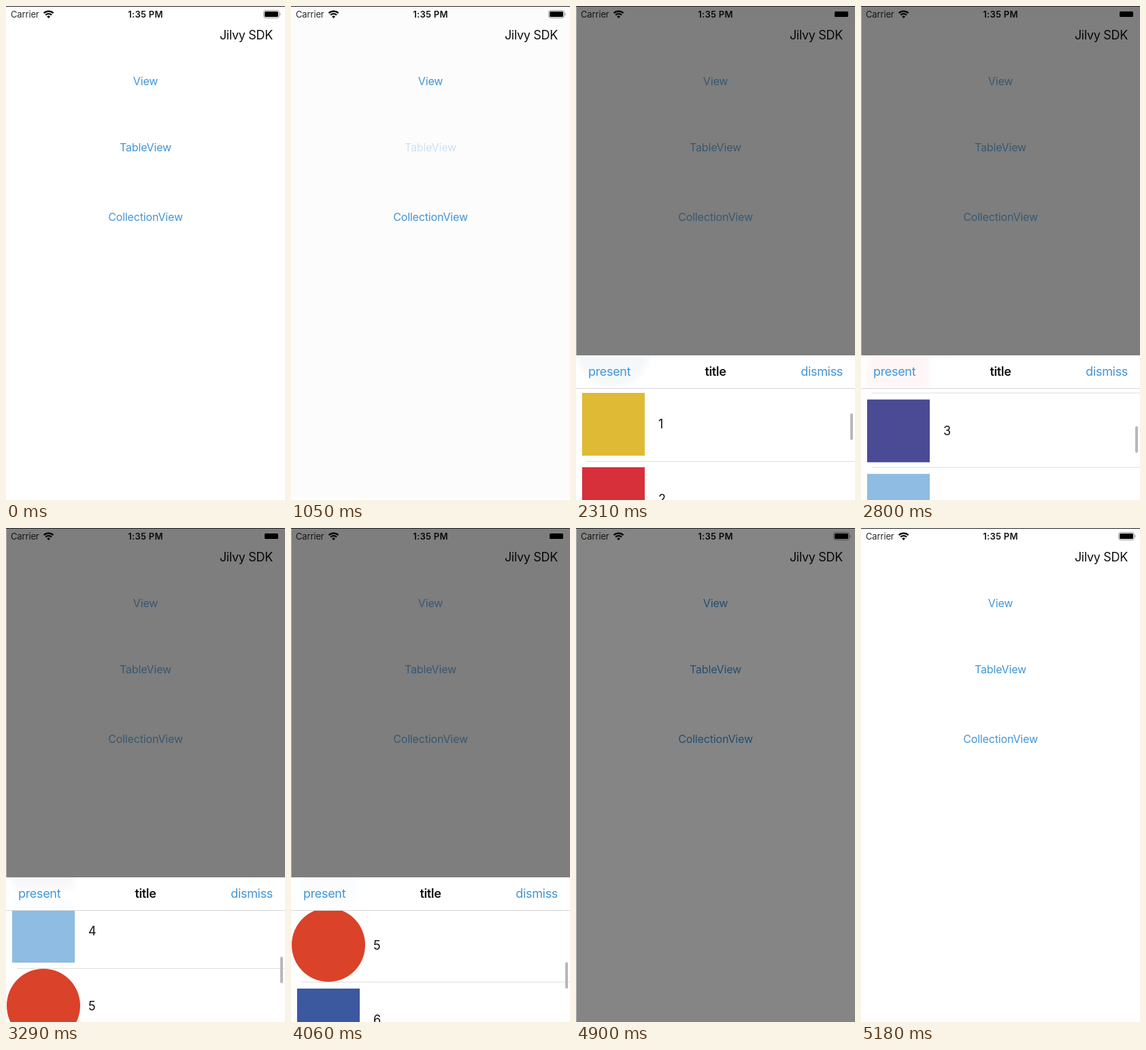
These frames come from a looping animation (410x724 px, 5460 ms). An HTML page:

```html
<!DOCTYPE html>
<html lang="en">
<head>
<meta charset="utf-8">
<title>Bottom sheet demo</title>
<style>
  html, body { margin: 0; width: 100%; height: 100%; overflow: hidden; background: #fff; }
  #stage {
    position: relative; width: 410px; height: 724px; overflow: hidden; background: #fff;
    font: 18px/24px Inter, sans-serif; letter-spacing: -.018em; color: #111;
  }
  #stage div, #stage svg { position: absolute; white-space: nowrap; }
  .link { color: #4196d8; }
  .menu { left: 0; width: 410px; text-align: center; font-size: 16px; letter-spacing: -.01em; }
  .status { top: 0; font-size: 13px; letter-spacing: -.01em; }
  #dim { inset: 1px 0 0; background: #000; border-left: 1px solid #666; }
  #sheet { left: 0; top: 512px; width: 410px; height: 212px; overflow: hidden; background: #fff; }
  #header {
    left: 0; top: 0; width: 410px; height: 48px; line-height: 48px;
    background: rgba(255, 255, 255, .955); backdrop-filter: blur(5px);
    border-bottom: 1px solid #d6d6d6;
  }
  #list { left: 0; top: 70px; width: 410px; }
  .row { left: 0; width: 410px; height: 109.33px; line-height: 109.33px; }
  .row::after { content: ""; position: absolute; left: 16px; right: 0; bottom: 0; height: 1px; background: #dedede; }
  .badge { left: 54.5px; top: 50%; transform: translate(-50%, -50%); }
  .number { left: 121px; letter-spacing: 0; }
  #bar { left: 403px; top: 73px; width: 4px; height: 39px; border-radius: 2px; background: #b8b8b8; }
</style>
</head>
<body>
<div id="stage">
  <div style="left:0;top:0;width:410px;height:1px;background:#222"></div>
  <div class="status" style="left:7px;color:#2a2a2a">Carrier</div>
  <div class="status" style="left:0;width:410px;text-align:center;font-weight:600;letter-spacing:.02em">1:35 PM</div>
  <svg width="410" height="24" style="left:0;top:0" fill="none" stroke="#000">
    <path d="M55.6 10.4a10 10 0 0 1 14 0M58.2 13.3a6.2 6.2 0 0 1 8.8 0" stroke-width="2.3"/>
    <path d="M62.6 18l-2.4-2.6a3.4 3.4 0 0 1 4.8 0z" fill="#000" stroke="none"/>
    <path id="outline" d="M381.5 6.5h17a3 3 0 0 1 3 3v5a3 3 0 0 1-3 3h-17a3 3 0 0 1-3-3v-5a3 3 0 0 1 3-3zM403 10.2v3.6"/>
    <rect x="380" y="8" width="20" height="8" rx="1.6" fill="#000" stroke="none"/>
  </svg>
  <div style="right:18px;top:31px">Jilvy SDK</div>
  <div id="menu">
    <div class="menu link" style="top:98px">View</div>
    <div class="menu link" style="top:195px" id="tapped">TableView</div>
    <div class="menu link" style="top:297px">CollectionView</div>
  </div>
  <div id="dim"></div>
  <div id="sheet">
    <div id="list"></div>
    <div id="header">
      <div class="link" style="left:18px">present</div>
      <div style="left:0;width:410px;text-align:center;font-weight:600">title</div>
      <div class="link" style="right:18px">dismiss</div>
    </div>
    <div id="bar"></div>
  </div>
</div>
<script>
const LOOP = 5460, STEP = 70, ROW = 109.33, SHEET = 212;
const byId = id => document.getElementById(id);
const menu = byId('menu'), tapped = byId('tapped'), outline = byId('outline'),
      dim = byId('dim'), sheet = byId('sheet'), list = byId('list'), bar = byId('bar');

// [colour, size, round]
const badges = [
  ['#2458a4', 109, true], ['#dfba35', 92], ['#d7303a', 92], ['#4b4a94', 92],
  ['#8fbce2', 92], ['#da4229', 108, true], ['#3c589f', 92], ['#c8323a', 92]
];
list.innerHTML = badges.map(([colour, size, round], i) =>
  `<div class="row" style="top:${i * ROW}px">
    <div class="badge" style="width:${size}px;height:${size}px;background:${colour};border-radius:${round ? '50%' : 0}"></div>
    <div class="number">${i}</div>
  </div>`).join('');

const ramp = (t, from, to) => Math.min(1, Math.max(0, (t - from) / (to - from)));
const ease = (t, from, to) => (1 - Math.cos(Math.PI * ramp(t, from, to))) / 2;

// [time, scroll offset, speed in px per ms]
const scrollPath = [[1990, 0, 0], [2310, 133, .5], [3290, 483, .22], [4060, 572, .05], [4480, 580, 0]];

function scrollAt(t) {
  const next = scrollPath.findIndex(key => t < key[0]);
  if (next === 0) return 0;
  if (next < 0) return scrollPath.at(-1)[1];
  const [t0, y0, v0] = scrollPath[next - 1], [t1, y1, v1] = scrollPath[next];
  const span = t1 - t0, u = (t - t0) / span;
  return y0 + (y1 - y0) * u * u * (3 - 2 * u)
    + span * u * (1 - u) * (v0 * (1 - u) - v1 * u);
}

function render(t) {
  const scroll = scrollAt(t);
  const shown = ease(t, 1020, 1367) - ease(t, 4550, 4850);
  const dimmed = ease(t, 1020, 1340) - ease(t, 4850, 5175);
  // Controls behind the sheet fade back a little while it is up.
  menu.style.opacity = 1 - .25 * shown;
  outline.style.opacity = .4 * (1 - shown);
  tapped.style.opacity = t < 910 ? 1 : .25 + .75 * ramp(t, 1050, 1330);
  dim.style.opacity = .505 * dimmed;
  sheet.style.transform = `translateY(${SHEET * (1 - shown)}px)`;
  list.style.transform = `translateY(${-scroll}px)`;
  bar.style.transform = `translateY(${scroll * .0895}px)`;
  bar.style.opacity = ramp(t, 1990, 2100) - ramp(t, 4550, 4800);
}

function tick() {
  const t = performance.now() % LOOP;
  render(Math.floor(t / STEP) * STEP);
  requestAnimationFrame(tick);
}
tick();
</script>
</body>
</html>
```
